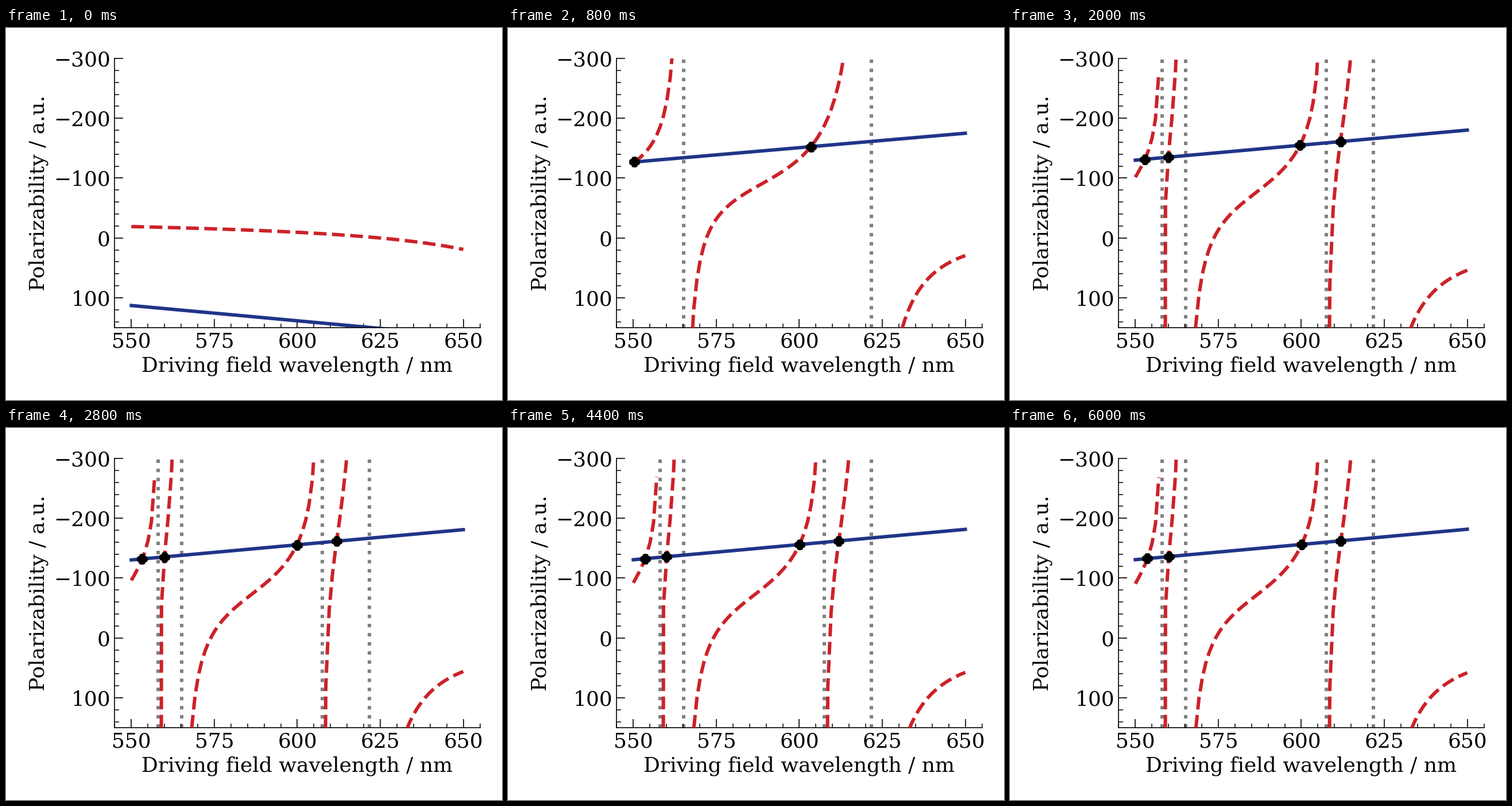
A matplotlib script for the animation above (6400 ms loop, 864x648 px).

```python
import numpy as np
import matplotlib.pyplot as plt
from matplotlib.animation import FuncAnimation
from matplotlib.ticker import MultipleLocator

W, H, DPI = 864, 648, 216
FRAMES, INTERVAL = 16, 400
RED, BLUE, GRAY = "#cc2229", "#1f3587", "#808080"

plt.rcParams.update({
    "font.family": "DejaVu Serif",
    "font.size": 12,
    "axes.linewidth": 0.55,
})

wave = np.linspace(550, 650, 100)

# Resonances (position in nm, strength), in the order they join the sum
POLES = [(620.9, 1950), (564.95, 690), (607.25, 345), (558.05, 126)]


def remainder(n):
    """Part of the sum still missing after n steps."""
    return n ** -1.5


def dashed_curve(n):
    if n == 0:
        return 2870 / (700 - wave) - 38.1
    if n < 3:
        base, tail = 59, 0
    else:
        base, tail = 42.7 + 48.5 * remainder(n), 430 - 1030 * remainder(n)
    alpha = -base + 10 * ((wave - 592) / 50) ** 2 + tail / (wave - 540)
    for pos, strength in POLES[:n]:
        alpha += strength / (wave - pos)
    return alpha


def solid_curve(n):
    if n == 0:
        ends = 113, 164
    else:
        ends = 12 * remainder(n) - 131, 20 * remainder(n) - 182
    return np.interp(wave, (550, 650), ends)


def crossings(dashed, solid):
    d = dashed - solid
    k = np.flatnonzero((d[:-1] > 0) & (d[1:] <= 0))
    t = d[k] / (d[k] - d[k + 1])
    x = wave[k] + t * (wave[k + 1] - wave[k])
    return np.column_stack([x, np.interp(x, wave, solid)])


fig = plt.figure(figsize=(W / DPI, H / DPI), dpi=DPI, facecolor="white")
ax = fig.add_axes([189.4 / W, 1 - 522 / H, 636.1 / W, 469 / H])
ax.set_xlim(545, 655)
ax.set_ylim(150, -300)
ax.spines[["top", "right"]].set_visible(False)
ax.xaxis.set_major_locator(MultipleLocator(25))
ax.xaxis.set_minor_locator(MultipleLocator(5))
ax.yaxis.set_major_locator(MultipleLocator(100))
ax.yaxis.set_minor_locator(MultipleLocator(20))
ax.tick_params(which="major", direction="in", length=5, width=0.55, pad=2.5)
ax.tick_params(which="minor", direction="in", length=2.5, width=0.5)

fig.text(507.2 / W, 1 - 598.5 / H, "Driving field wavelength / nm",
         ha="center", va="baseline")
fig.text(67 / W, 1 - 287.5 / H, "Polarizability / a.u.", rotation=90,
         rotation_mode="anchor", ha="center", va="baseline")

guides = [ax.axvline(600, color=GRAY, lw=2, ls=":", zorder=1) for _ in POLES]
solid_line, = ax.plot([], [], color=BLUE, lw=2, zorder=2)
dashed_line, = ax.plot([], [], color=RED, lw=2, ls="--", zorder=3)
marks = ax.scatter([], [], s=14, marker="P", color="black", lw=2.2,
                   joinstyle="round", zorder=4)


def draw(n):
    dashed, solid = dashed_curve(n), solid_curve(n)
    jumps = np.flatnonzero(np.diff(dashed) > 100) + 1
    for i, guide in enumerate(guides):
        guide.set_visible(i < len(jumps))
        if i < len(jumps):
            guide.set_xdata([wave[jumps[i]]] * 2)
    # Break the curve at each resonance
    dashed_line.set_data(np.insert(wave, jumps, np.nan),
                         np.insert(dashed, jumps, np.nan))
    solid_line.set_data(wave, solid)
    marks.set_offsets(crossings(dashed, solid))
    return [*guides, solid_line, dashed_line, marks]


anim = FuncAnimation(fig, draw, frames=FRAMES, interval=INTERVAL,
                     init_func=lambda: draw(0), repeat=True, repeat_delay=0)
plt.show()
```
